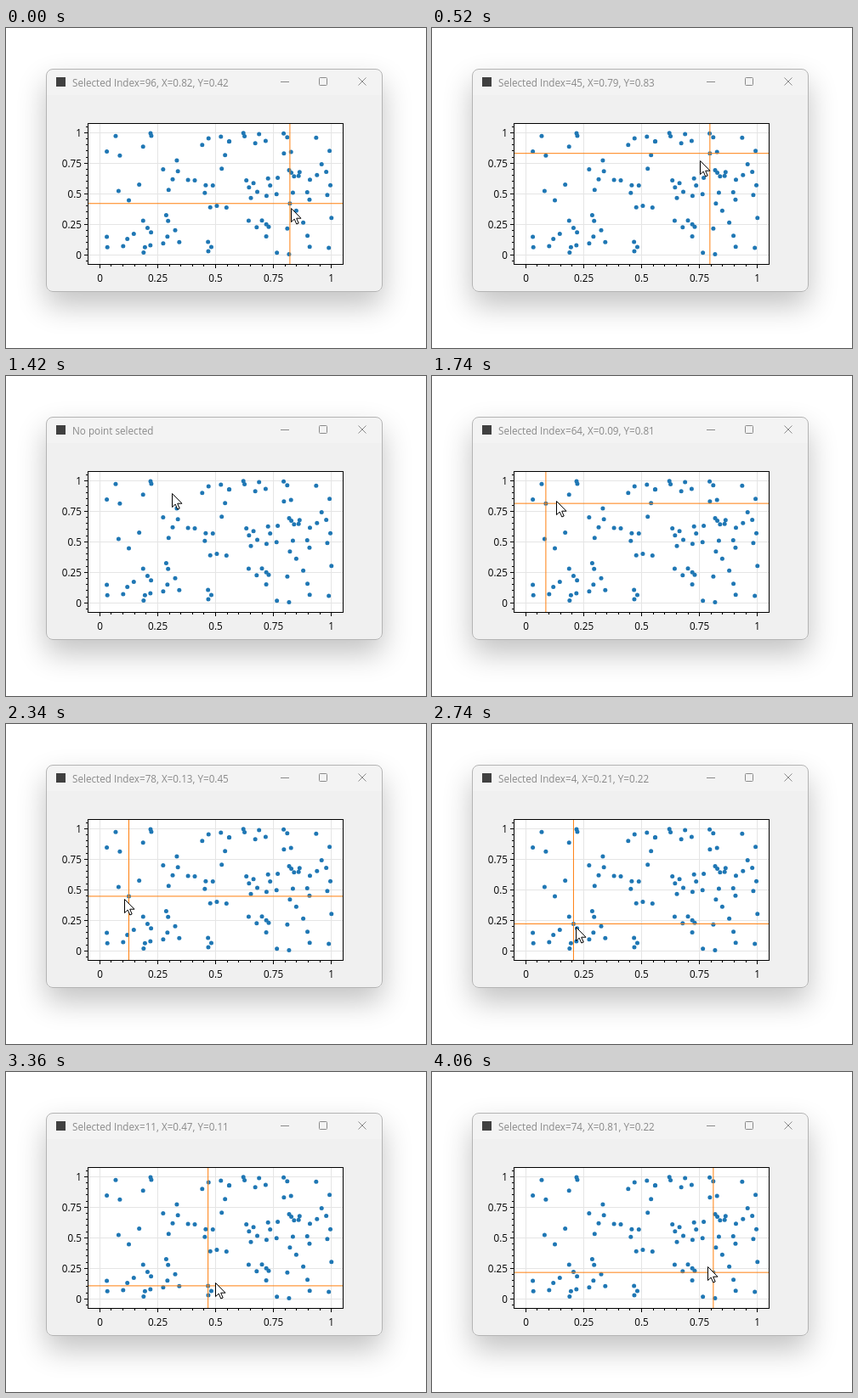
An HTML page for the animation above (4160 ms loop, 494 px wide and 377 px high).

```html
<!DOCTYPE html>
<html lang="en">
<head>
<meta charset="utf-8">
<title>Scatter hover</title>
<style>
html, body { margin: 0; width: 494px; height: 377px; overflow: hidden; background: #fff; }
body { position: relative; font: 11.7px "Open Sans", "Noto Sans", sans-serif; }
#win {
  position: absolute; left: 47px; top: 48px; width: 394px; height: 261px;
  border: 1px solid #b4b4b4; border-radius: 8px; overflow: hidden;
  background: linear-gradient(#f3f3f3 30px, #f0f0f0 30px);
  box-shadow: 0 16px 34px rgba(0, 0, 0, .24);
}
#title {
  position: absolute; left: 78px; top: 56px; line-height: 16px;
  white-space: pre; color: #898989;
}
svg { position: absolute; left: 0; top: 0; display: block; }
</style>
</head>
<body>
<div id="win"></div>
<div id="title"></div>
<svg id="stage" width="494" height="377" viewBox="0 0 494 377">
  <rect x="59" y="58" width="11" height="11" fill="#404040"/>
  <g fill="none" stroke="#8a8a8a">
    <path d="M323 63.5h10M414.5 58.5l9 9M423.5 58.5l-9 9"/>
    <rect x="368.5" y="58.5" width="9" height="9" rx="1"/>
  </g>
  <rect x="97" y="113" width="299" height="165" fill="#fff"/>
  <g id="grid" stroke="#e5e5e5"></g>
  <g id="dots" fill="#1f77b4"></g>
  <g id="cross" stroke="#ff7f0e"><line id="vert" y1="113" y2="278"/><line id="horz" x1="97" x2="396"/></g>
  <g id="ticks" stroke="#000"><rect x="96.5" y="112.5" width="300" height="166" fill="none"/></g>
  <g id="labels" fill="#000"></g>
  <path id="cursor" d="M.5 .5V16.6L4.2 13.1L6.8 19L9.2 18L6.7 12.2H12Z" fill="#fff" stroke="#000"/>
</svg>
<script>
const $ = id => document.getElementById(id);
const add = (parent, tag, attrs, text) => {
  const el = document.createElementNS('http://www.w3.org/2000/svg', tag);
  for (const k in attrs) el.setAttribute(k, attrs[k]);
  if (text !== undefined) el.textContent = text;
  return $(parent).appendChild(el);
};

// Subtractive random generator (Knuth), seeded with 0
function makeRandom() {
  const M = 2147483647, a = [];
  const sub = (p, q) => (p - q + M) % M;
  let prev = 161803398, cur = 1;
  a[55] = prev;
  for (let i = 1; i < 55; i++) {
    const k = 21 * i % 55;
    a[k] = cur;
    cur = sub(prev, cur);
    prev = a[k];
  }
  for (let r = 0; r < 4; r++)
    for (let k = 1; k < 56; k++) a[k] = sub(a[k], a[1 + (k + 30) % 55]);
  let p = 0, q = 21;
  return () => {
    p = p % 55 + 1;
    q = q % 55 + 1;
    a[p] = sub(a[p], a[q]);
    return a[p] / M;
  };
}

const px = x => 110.3 + 272.5 * x;
const py = y => 267.3 - 144 * y;
const random = makeRandom();
const xs = Array.from({ length: 100 }, random);
const ys = Array.from({ length: 100 }, random);
xs.forEach((x, i) => add('dots', 'circle', { cx: px(x), cy: py(ys[i]), r: 2.5 }));

// Axes: a minor tick every 0.05, a major one every 0.25
for (let i = -1; i <= 21; i++) {
  const v = i / 20, major = i % 5 === 0, len = major ? 4 : 2;
  const x = Math.floor(px(v)) + .5, y = Math.floor(py(v)) + .5;
  add('ticks', 'path', { d: `M${96 - len} ${y}h${len}` });
  if (i >= 0 && i <= 20) add('ticks', 'path', { d: `M${x} 279v${len}` });
  if (!major) continue;
  add('grid', 'path', { d: `M${x} 113v165M97 ${y}h299` });
  add('labels', 'text', { x, y: 299, 'text-anchor': 'middle' }, v);
  add('labels', 'text', { x: 89, y: y + 4, 'text-anchor': 'end' }, v);
}

// Pointer path: time, x, y
const LOOP = 4160;
const path = [
  [0, 335, 212], [620, 306, 151], [1020, 267, 145], [1740, 145.5, 147],
  [1940, 133, 165], [2040, 131, 181], [2340, 139, 206], [2740, 169, 238.5],
  [3040, 224, 254], [3360, 246, 248], [3660, 291, 246], [4060, 324, 229]
];
const knot = i => {
  const n = path.length, turn = Math.floor(i / n), [t, x, y] = path[i - turn * n];
  return [t + turn * LOOP, x, y];
};
function slope(i, axis) {
  const a = knot(i - 1), b = knot(i), c = knot(i + 1);
  const h0 = b[0] - a[0], h1 = c[0] - b[0];
  return ((b[axis] - a[axis]) / h0 * h1 + (c[axis] - b[axis]) / h1 * h0) / (h0 + h1);
}
function pointer(t) {
  t = (t + LOOP) % LOOP;
  let i = 0;
  while (knot(i + 1)[0] <= t) i++;
  const a = knot(i), b = knot(i + 1), h = b[0] - a[0], u = (t - a[0]) / h, w = 1 - u;
  return [1, 2].map(k =>
    w * w * (1 + 2 * u) * a[k] + u * u * (3 - 2 * u) * b[k] +
    h * u * w * (w * slope(i, k) - u * slope(i + 1, k)));
}

// Screen updates roughly every 100 ms
const holds = { 0: 120, 14: 110, 15: 110, 27: 110, 29: 90, 30: 110, 31: 110 };
const starts = [];
for (let t = 0, i = 0; t < LOOP; t += holds[i++] || 100) starts.push(t);

const LAG = 12, REACH = 15;
function nearest([mx, my]) {
  let best = -1, min = REACH;
  xs.forEach((x, i) => {
    const d = Math.hypot(px(x) - mx, py(ys[i]) - my);
    if (d < min) { min = d; best = i; }
  });
  return best;
}

function show(t) {
  const [x, y] = pointer(t).map(Math.round);
  $('cursor').setAttribute('transform', `translate(${x} ${y})`);
  const i = nearest(pointer(t - LAG));
  $('cross').style.display = i < 0 ? 'none' : '';
  if (i < 0) {
    $('title').textContent = 'No point selected';
    return;
  }
  for (const k of ['x1', 'x2']) $('vert').setAttribute(k, px(xs[i]));
  for (const k of ['y1', 'y2']) $('horz').setAttribute(k, py(ys[i]));
  const num = v => +v.toFixed(2);
  $('title').textContent = `Selected Index=${i}, X=${num(xs[i])}, Y=${num(ys[i])}`;
}

const begin = performance.now();
let shown = -1;
function tick() {
  const t = (performance.now() - begin) % LOOP;
  const start = starts.filter(s => s <= t).pop();
  if (start !== shown) show(shown = start);
  requestAnimationFrame(tick);
}
tick();
</script>
</body>
</html>
```
